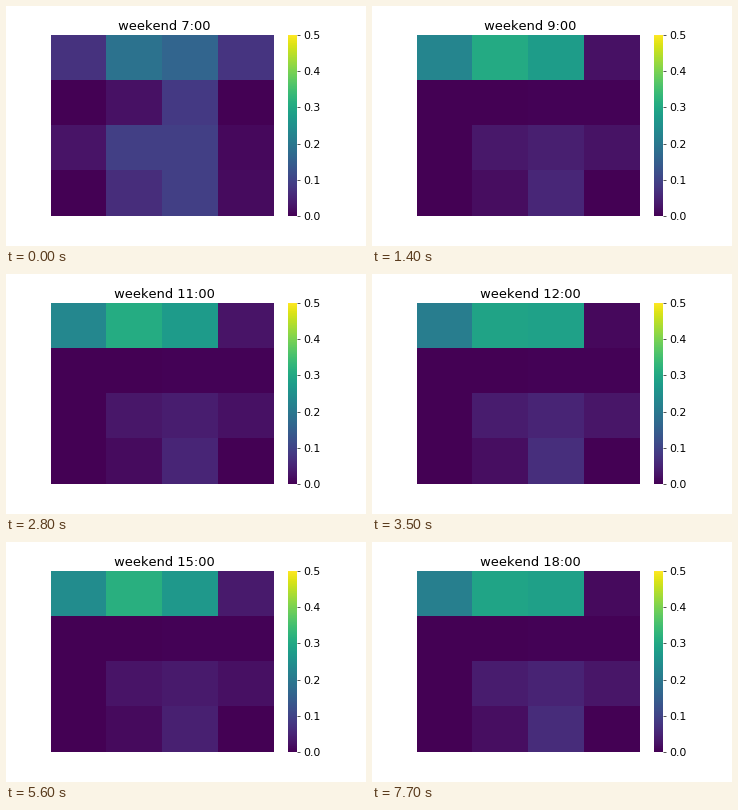
Recreate the animation shown at these times as a matplotlib script. Size 360 by 240 pixels, loop 8000 ms.

```python
import numpy as np
import matplotlib.pyplot as plt
from matplotlib.animation import FuncAnimation

plt.rcParams.update({
    "font.family": "DejaVu Sans",
    "font.size": 13,
    "text.kerning_factor": 6,
})

STEP, INTERVAL, LOOP = 700, 100, 8000
FIRST_HOUR = 7

# Two key poses: the opening hour, and the quiet part of the day
MORNING = np.array([[.071, .188, .162, .075],
                    [0, .022, .083, 0],
                    [.027, .092, .092, .010],
                    [0, .063, .093, .014]])
DAY = np.array([[.207, .286, .286, .007],
                [0, 0, .003, .004],
                [0, .040, .052, .030],
                [0, .020, .067, 0]])
PEAK_GAIN = np.array([.035, .030, -.020, .027])


def grid_at(hour):
    """Two swells a day lift the top row and thin out the rest."""
    if hour == FIRST_HOUR:
        return MORNING
    swell = np.sin(np.pi * (hour - 7.7) / 4.8) ** 2
    grid = DAY * (1 - 0.35 * swell)
    grid[0] = DAY[0] + PEAK_GAIN * swell
    return grid


fig, ax = plt.subplots(figsize=(6, 4), dpi=60, facecolor="white")
fig.subplots_adjust(left=0.125, right=0.9, bottom=0.125, top=0.88)

# Cell edges in stage pixels, snapped down to whole pixels
left, right, top, bottom = 45, 268.2, 28.8, 210
x_edges = np.floor(np.linspace(left, right, 5))
y_edges = np.floor(np.linspace(top, bottom, 5))
mesh = ax.pcolormesh(x_edges, y_edges, MORNING, cmap="viridis",
                     vmin=0, vmax=0.5)
ax.set(xlim=(left, right), ylim=(bottom, top))
ax.axis("off")
title = ax.set_title("")

bar = fig.colorbar(mesh, ax=ax)
bar.outline.set_linewidth(0)


def update(frame):
    hour = FIRST_HOUR + frame * INTERVAL // STEP
    mesh.set_array(grid_at(hour))
    title.set_text(f" weekend {hour}:00")
    return mesh, title


anim = FuncAnimation(fig, update, frames=LOOP // INTERVAL, interval=INTERVAL,
                     repeat=True, repeat_delay=0, blit=False)
plt.show()
```
